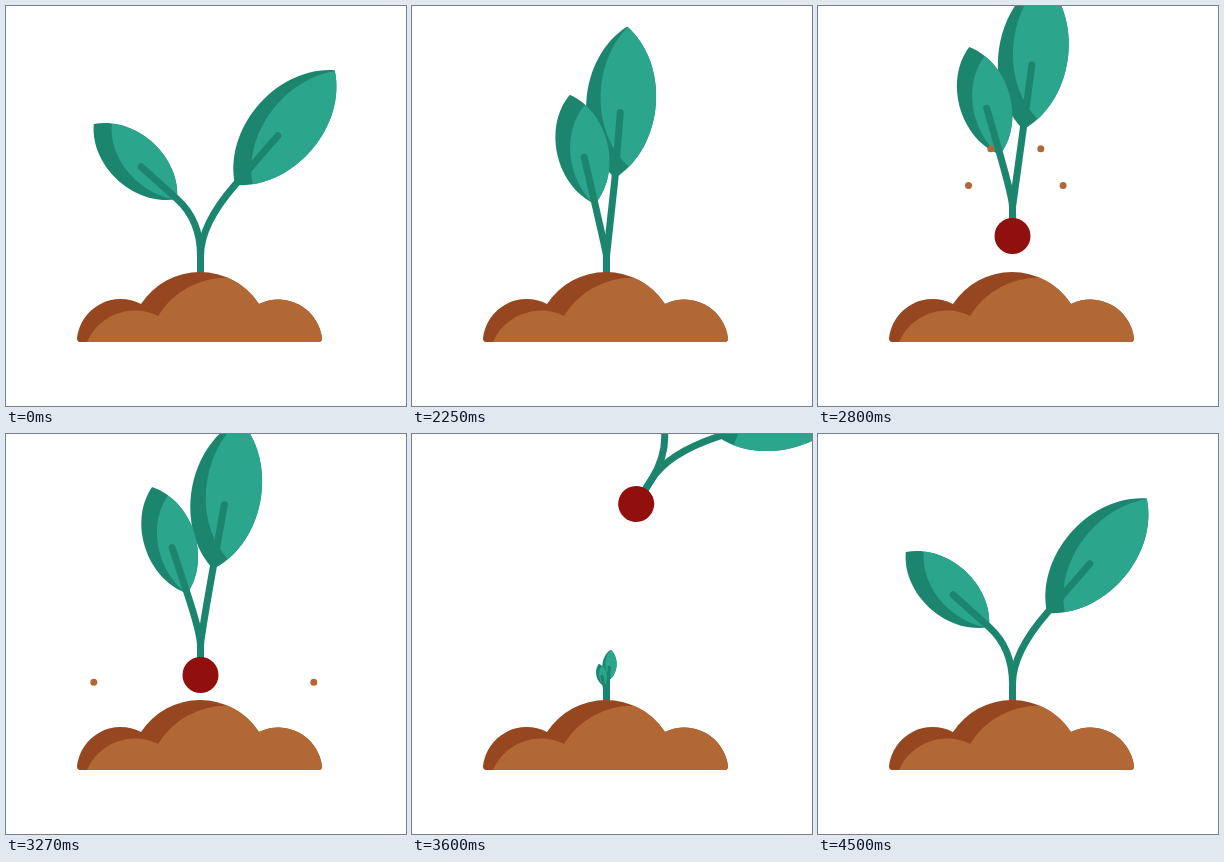
An HTML page with a canvas that plays this animation: 400 px wide and 400 px high, repeating every 4.52 s.

```html
<!DOCTYPE html>
<html lang="en">
<head>
<meta charset="utf-8">
<title>Sprout</title>
<style>
  html, body { margin: 0; width: 100%; height: 100%; overflow: hidden; background: #fff; }
  canvas { display: block; width: 100vw; height: 100vh; }
</style>
</head>
<body>
<canvas id="stage" width="400" height="400"></canvas>
<script>
const ctx = document.getElementById('stage').getContext('2d');
const LOOP = 4520;
const LIGHT = '#2ca58d', DARK = '#1c856e';
const SOIL = '#b16835', SOIL_DARK = '#964720', BULB = '#910f0c';
const ROOT = 194.5, GROUND = 266, FORK = 250, STEM = 7;

const rad = deg => deg * Math.PI / 180;
const mix = (a, b, u) => a + (b - a) * u;
const part = (t, from, to) => Math.min(1, Math.max(0, (t - from) / (to - from)));
const ease = (t, from, to) => {
  const u = part(t, from, to);
  return u * u * (3 - 2 * u);
};

// Each pair holds the open and the folded value.
const right = { x: [229, 203], y: [179, 172], angle: [41, 4.6], size: 152 };
const left = { x: [171, 183], y: [193, 198], angle: [-48, -13], size: 112 };

const soil = new Path2D('M74 336Q71 336 71 332A44 44 0 0 1 135 298A70.4 70.4 0 0 1 253 298A44 44 0 0 1 316 332Q316 336 313 336Z');
const soilFront = new Path2D('M81 336A52 52 0 0 1 152 310A80 80 0 0 1 222 271.8A70.4 70.4 0 0 1 253 298A44 44 0 0 1 316 332Q316 336 313 336Z');

function fill(path, color) {
  ctx.fillStyle = color;
  ctx.fill(path);
}

function dot(x, y, r, color) {
  const path = new Path2D();
  path.arc(x, y, r, 0, 7);
  fill(path, color);
}

// A pointed oval with its base at the origin, growing upwards.
function leafPath(size) {
  const w = .305 * size, low = -.23 * size, high = -.77 * size;
  const path = new Path2D();
  path.moveTo(0, 0);
  path.bezierCurveTo(-w, low, -w, high, 0, -size);
  path.bezierCurveTo(w, high, w, low, 0, 0);
  return path;
}

// The light side is the leaf overlapped with a copy moved sideways.
function leaf({ angle, size }, x, y, tilt) {
  const path = leafPath(size);
  const open = rad(angle[0]);
  ctx.save();
  ctx.translate(x, y);
  ctx.rotate(tilt);
  fill(path, DARK);
  ctx.clip(path);
  ctx.translate(18 * Math.cos(open), -18 * Math.sin(open));
  fill(path, LIGHT);
  ctx.restore();
}

// The stem bends until it meets the axis of the leaf, then becomes its vein.
function branch(side, fold, width) {
  const x = mix(...side.x, fold), y = mix(...side.y, fold);
  const tilt = rad(mix(...side.angle, fold));
  const vein = .43 * side.size;
  leaf(side, x, y, tilt);
  ctx.beginPath();
  ctx.moveTo(ROOT, 280);
  ctx.lineTo(ROOT, FORK);
  ctx.quadraticCurveTo(ROOT, Math.min(FORK, y + (x - ROOT) / Math.tan(tilt)), x, y);
  ctx.lineTo(x + vein * Math.sin(tilt), y - vein * Math.cos(tilt));
  ctx.strokeStyle = DARK;
  ctx.lineWidth = width;
  ctx.lineCap = ctx.lineJoin = 'round';
  ctx.stroke();
}

function plant(fold, width = STEM) {
  branch(right, fold, width);
  branch(left, fold, width);
}

function pulledPlant(t) {
  const fling = Math.max(0, (t - 3270) / 330) ** 2;
  const fold = ease(t, 2000, 2250) - .15 * ease(t, 2250, 3270) - .8 * ease(t, 3270, 3600);
  const y = -50 * ease(t, 2300, 2740) + 12 * ease(t, 2700, 3270) - 170 * fling;
  ctx.save();
  ctx.translate(ROOT + 29.5 * fling, 279 + y);
  ctx.rotate(rad(32 * fling));
  ctx.translate(-ROOT, -279);
  plant(fold);
  dot(ROOT, 292 - 13 * ease(t, 2400, 2560), 18, BULB);
  ctx.restore();
}

function youngPlant(t) {
  const size = 1 - (1 - part(t, 3500, LOOP)) ** 2.2;
  if (size <= 0) return;
  const trunk = Math.min(20, 100 * size);
  ctx.fillStyle = DARK;
  ctx.fillRect(ROOT - STEM / 2, GROUND - trunk, STEM, trunk + 4);
  ctx.save();
  ctx.translate(ROOT, GROUND);
  ctx.scale(size, size);
  ctx.translate(-ROOT, -GROUND);
  plant(1 - ease(t, 3600, 4300), STEM / Math.sqrt(size));
  ctx.restore();
}

// A mirrored pair of crumbs thrown out of the hole.
function crumbs(t, duration, reach, height) {
  const u = part(t, 2545, 2545 + duration);
  if (u === 0 || u === 1) return;
  const dx = reach / 2 * (1 - Math.cos(Math.PI * u));
  const y = 276 + 15 * u - height * Math.sin(Math.PI * u) ** 1.5;
  for (const side of [-1, 1]) dot(197.8 + side * dx, y, 3.5, SOIL);
}

function draw(t) {
  ctx.fillStyle = '#fff';
  ctx.fillRect(0, 0, 400, 400);
  if (t < 3750) pulledPlant(t);
  youngPlant(t);
  crumbs(t, 510, 94, 104);
  crumbs(t, 825, 114, 183);
  fill(soil, SOIL_DARK);
  fill(soilFront, SOIL);
}

const start = performance.now();
function tick() {
  draw((performance.now() - start) % LOOP);
  requestAnimationFrame(tick);
}
tick();
</script>
</body>
</html>
```
